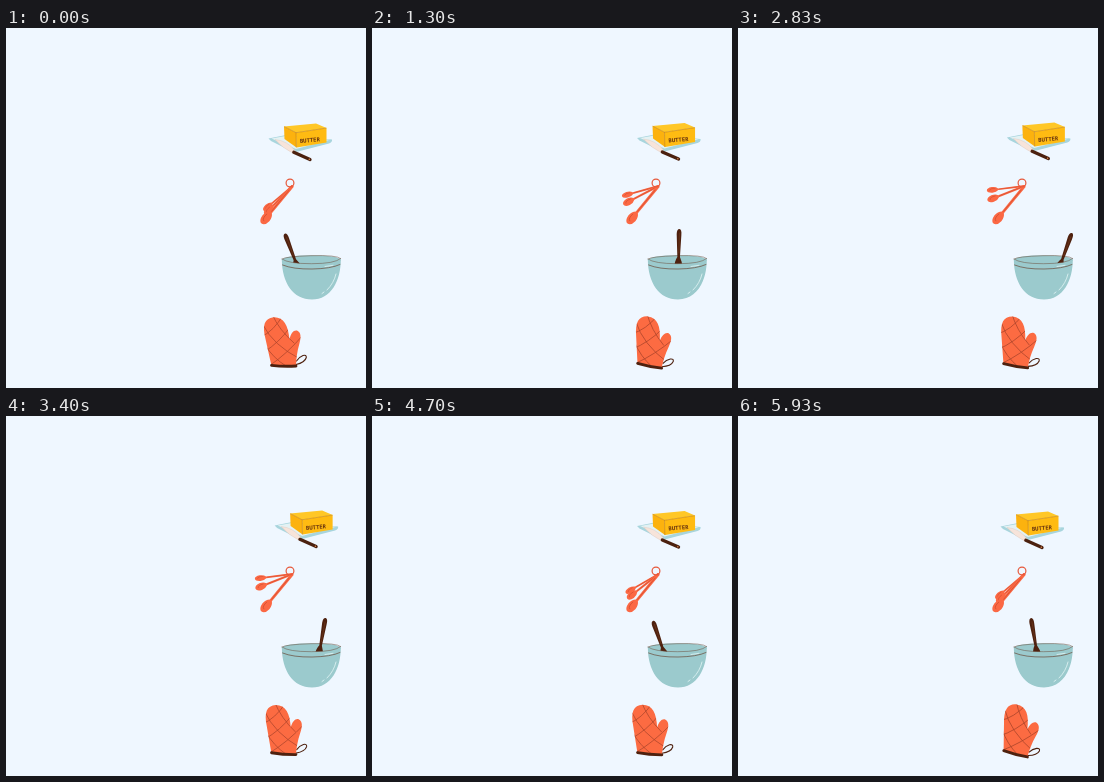
Recreate the animation shown at these times as an HTML page. Size 360x360 px, loop 6010 ms.

```html
<!DOCTYPE html>
<html lang="en">
<head>
<meta charset="utf-8">
<title>Baking tools</title>
<style>
html, body { margin: 0; width: 100%; height: 100%; overflow: hidden; background: #eff7ff; }
svg { display: block; width: 100vw; height: 100vh; }
text { font: 600 5.6px "Noto Sans Mono", "DejaVu Sans Mono", monospace; }
.line { fill: none; stroke: #6b4a38; stroke-width: .7; stroke-linecap: round; stroke-linejoin: round; }
.shine { fill: none; stroke: #e3f5f5; stroke-width: .8; stroke-linecap: round; }
</style>
</head>
<body>
<svg viewBox="0 0 360 360">
  <defs>
    <clipPath id="mittShape"><use href="#mittBody"/></clipPath>
    <g id="measure">
      <path d="M0 -1.200L-26 -1.100Q-28 -3.600-32 -3.700Q-37-3.200-37.200 0Q-37 3.200-32 3.700Q-28 3.600-26 1.100L0 1.200Q1.200 0 0 -1.200Z" fill="#fb6844"/>
      <path d="M-4 0H-25M-29 -1.600Q-34-2.600-34.500 0" class="line" style="stroke:#cc4a2d;stroke-width:.5"/>
    </g>
  </defs>

  <g id="butter">
    <path d="M262.500 110.500L280 107L326 111.500Q326.500 114 323 115.500L292 123.500Q288 124.500 284 122.500L265 113Z" fill="#a8d5dd"/>
    <path d="M265.500 110.500L281 107.700L324 111.700L290 121Z" fill="#e4f2f4"/>
    <path d="M278 98.500L310 95.500L320.500 100L290 104.700Z" fill="#ffc727"/>
    <path d="M290 104.700L320.500 100L320.500 114.400L290.500 119.500Z" fill="#ffbb12"/>
    <path d="M278 98.500L290 104.700L290.500 119.500L278.500 111Z" fill="#fcb20e"/>
    <path class="line" style="stroke:#b8740f;stroke-width:.5" d="M278.500 98.700L290 104.700L320 100.100M290 104.700L290.300 119"/>
    <text transform="translate(294 115) rotate(-5)" fill="#67330f">BUTTER</text>
    <path d="M269 111.500Q281 112.500 289 122.500L287 125.200Q277 120.500 269 111.500Z" fill="#f7e4da" stroke="#d8c8c0" stroke-width=".4"/>
    <path d="M287.800 124.300L304 131.500" stroke="#4b210f" stroke-width="3.300" stroke-linecap="round"/>
    <circle cx="303.300" cy="131.200" r=".7" fill="#e88c4f"/>
  </g>

  <g transform="translate(286.500 158)">
    <g id="small"><use href="#measure" transform="scale(1.02 .78)"/></g>
    <g id="medium"><use href="#measure" transform="scale(1.07 .95)"/></g>
    <g transform="rotate(-50.500)"><use href="#measure" transform="scale(1.31 1.230)"/></g>
  </g>
  <circle cx="284" cy="155" r="3.900" fill="none" stroke="#e6593c" stroke-width="1.200"/>

  <ellipse cx="305.300" cy="232" rx="29.500" ry="4.800" fill="#9bcacd"/>
  <path class="line" style="stroke-width:.5" d="M276 231Q279 228.500 305 227.700T334.600 230.500"/>
  <g id="stir">
    <path d="M-1.200 -8L-2.300 -31Q-2.200 -36 .4 -36Q2.800 -35.500 2.400 -30L1.400 -8Q4 -3 4 3H-4Q-4 -4-1.200 -8Z" fill="#4e210f"/>
    <path d="M.4 -32L.2 -12" class="line" style="stroke:#7b4021;stroke-width:.5"/>
  </g>
  <path d="M275.800 231Q282 235.700 305.500 235.700T334.800 230.500C335 253 325 271.500 306 271.500S276 255 275.800 231Z" fill="#9bcacd"/>
  <path class="line" style="stroke-width:.5" d="M276 231Q282 235.700 305.500 235.700T334.600 230.500"/>
  <path class="line" d="M276.600 237Q287 241.300 306 241T334 236.500"/>
  <path class="shine" d="M330 246Q328 255 321 262M318 264L316 265.500M319 238.500L327 237.300"/>

  <g id="mitt">
    <path d="M290 336.500Q299 334.500 300.300 329.500Q300.500 326.500 297 327.500Q293 329 290.500 333" class="line" style="stroke:#4e210f;stroke-width:1.100"/>
    <path id="mittBody" d="M265.300 337L259.500 311C256 297 258.500 290.500 267.500 289.300C277.500 288.800 282 297 283.500 311C285 305 287.500 301.800 291 302.500C295.500 304.500 295 310 293.300 316C291 324 290.300 331 290 337.500Z" fill="#fc6b42"/>
    <g clip-path="url(#mittShape)">
      <path class="line" style="stroke:#a8432a" d="M255 309Q268 303 277 287M258 324Q273 315 285 298M263 338Q281 326 297 307M266 286Q273 302 288 315M257 297Q267 317 294 331M259 317Q267 330 280 338"/>
    </g>
    <path d="M265.500 337.300Q277 338.700 290 338" fill="none" stroke="#4e210f" stroke-width="2.800" stroke-linecap="round"/>
  </g>
</svg>
<script>
const LOOP = 6010;
const put = (id, transform) => document.getElementById(id).setAttribute('transform', transform);
const wave = (t, period) => Math.cos(2 * Math.PI * t / period);
const ease = (t, from, to) => {
  const x = Math.min(1, Math.max(0, (t - from) / (to - from)));
  return x * x * (3 - 2 * x);
};

function draw(now) {
  // Poses change twice per 100 ms, at 0 and 30.
  const time = now % LOOP;
  const t = Math.min(5930, Math.floor(time / 100) * 100 + (time % 100 >= 30 ? 30 : 0));

  const slide = (1 - wave(t, 6000)) / 2;
  put('butter', `translate(${6.4 * slide} ${-slide})`);

  const open = ease(t, 100, 1900) - ease(t, 3300, 5500);
  put('small', `rotate(${33 * open - 40})`);
  put('medium', `rotate(${24 * open - 45.5})`);

  const c = wave(t, 5040);
  const lean = Math.atan2(-12.3 * c, 32) * 180 / Math.PI;
  put('stir', `translate(${305.6 - 15.7 * c + 1.7 * c * c} ${237 + 2.2 * c * c}) rotate(${lean})`);

  put('mitt', `rotate(${6.7 * (1 - wave(t, 4000))} 277 337)`);
  requestAnimationFrame(() => draw(performance.now() - start));
}

const start = performance.now();
draw(0);
</script>
</body>
</html>
```
